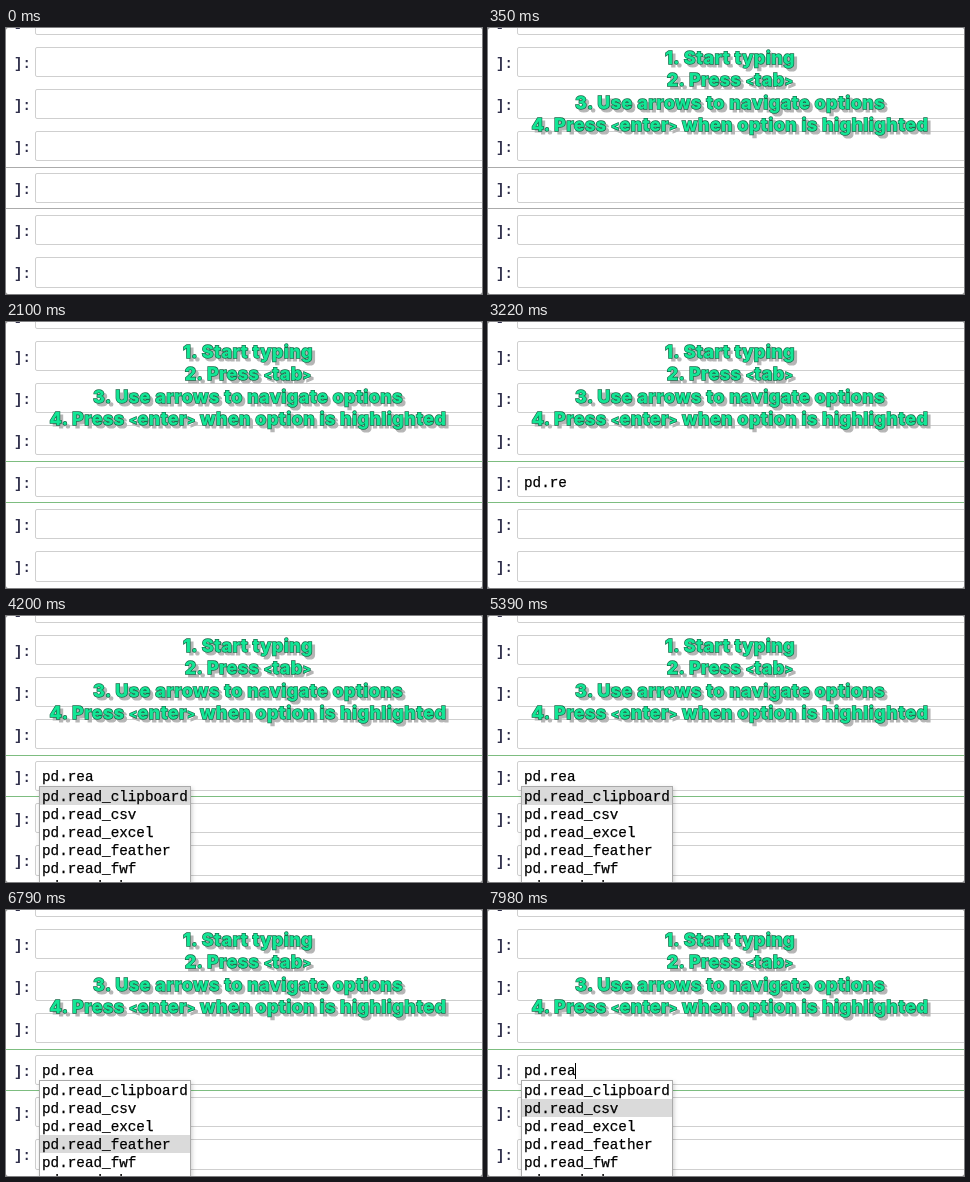
An HTML page for the animation above (8000 ms loop, 476 by 266 pixels).

```html
<!DOCTYPE html>
<html lang="en">
<head>
<meta charset="utf-8">
<title>Tab completion</title>
<style>
  html, body { margin: 0; width: 100%; height: 100%; overflow: hidden; background: #777; }
  svg { display: block; width: 476px; height: 266px; background: #fff; border-radius: 2px; }
  text { white-space: pre; }
  .code { font: 14.3px "Liberation Mono", monospace; fill: #000; stroke: #000; stroke-width: .25px; }
  .prompt { font: 700 14px "Liberation Mono", monospace; fill: #30304c; }
  .box { fill: #fff; stroke: #cfcfcf; }
  .title { font: 800 18px Inter, sans-serif; letter-spacing: .43px; text-anchor: middle; }
  .bracket { font-size: 12px; }
  .shadow { fill: #b5b5b5; stroke: #b5b5b5; stroke-width: 1.2px; }
  .face { fill: #12e695; stroke: #176b49; stroke-width: 1.3px; paint-order: stroke; }
</style>
</head>
<body>
<svg id="stage" viewBox="0 0 476 266"></svg>
<script>
const LOOP = 8000;
const ROW = 18;
const stage = document.getElementById('stage');

function add(parent, tag, attrs = {}, text = '') {
  const node = document.createElementNS(stage.namespaceURI, tag);
  for (const key in attrs) node.setAttribute(key, attrs[key]);
  node.textContent = text;
  return parent.appendChild(node);
}

// Notebook cells
for (let i = -1; i < 6; i++) {
  const y = 19.5 + i * 42;
  const bottom = Math.round(48.05 + i * 42.1) + 0.5;
  add(stage, 'rect', { class: 'box', x: 29.5, y, width: 460, height: bottom - y, rx: 1.5 });
  add(stage, 'text', { class: 'prompt', x: 8, y: y + 20 }, ']:');
}
const edges = [139.5, 180.5].map(y =>
  add(stage, 'path', { d: `M0 ${y}H476`, fill: 'none' }));

const typed = add(stage, 'text', { class: 'code', x: 36, y: 165 });
const caret = add(stage, 'rect', { y: 153, width: 1, height: 16 });

// Instructions, with small angle brackets
const title = add(stage, 'g');
const lines = [
  ['1. Start typing', 36],
  ['2. Press <tab>', 58],
  ['3. Use arrows to navigate options', 81],
  ['4. Press <enter> when option is highlighted', 103]
];
function addTitle(layer, offset) {
  for (const [text, y] of lines) {
    const line = add(title, 'text', { class: 'title ' + layer, x: 242 + offset, y: y + offset });
    let lift = 0;
    for (const part of text.split(/([<>])/)) {
      const bracket = part === '<' || part === '>';
      const dy = bracket ? -1 : lift;
      add(line, 'tspan', { class: bracket ? 'bracket' : '', dy }, part);
      lift = bracket ? 1 : 0;
    }
  }
}
addTitle('shadow', 3);
addTitle('face', 0);

// Completion menu
const menu = add(stage, 'g');
add(menu, 'rect', { x: 33.5, y: 170.5, width: 151, height: 120, fill: '#fff', stroke: '#aaa',
  style: 'filter: drop-shadow(1px 2px 2px #0003)' });
const bar = add(menu, 'rect', { x: 34, width: 150, height: ROW, fill: '#dadada' });
['clipboard', 'csv', 'excel', 'feather', 'fwf', 'gbq'].forEach((name, i) =>
  add(menu, 'text', { class: 'code', x: 36, y: 184.5 + i * ROW }, 'pd.read_' + name));

const KEYS = [2590, 2660, 2800, 3080, 3150, 3290];
const CHOICES = [[0, 0], [5460, 1], [5670, 2], [5810, 3], [6160, 2], [6300, 1],
  [6580, 2], [6650, 3], [6930, 2], [7070, 1]];
const MENU_AT = 3710, EDIT_AT = 1470, TITLE_AT = 70;
const BLINK = 530, BLINK_PHASE = 40;

function show(node, on) {
  node.setAttribute('visibility', on ? 'visible' : 'hidden');
}

function render(t) {
  show(title, t >= TITLE_AT);
  const editing = t >= EDIT_AT;
  for (const edge of edges) edge.setAttribute('stroke', editing ? '#7dbd80' : '#ababab');

  const count = KEYS.filter(at => t >= at).length;
  typed.textContent = 'pd.rea'.slice(0, count);
  caret.setAttribute('x', 36 + Math.round(count * 8.45));
  show(caret, editing && Math.floor((t + BLINK_PHASE) / BLINK) % 2 === 1);

  show(menu, t >= MENU_AT);
  const choice = CHOICES.filter(([at]) => t >= at).pop()[1];
  bar.setAttribute('y', 171 + choice * ROW);
}

const start = performance.now();
function tick() {
  render((performance.now() - start) % LOOP);
  requestAnimationFrame(tick);
}
render(0);
tick();
</script>
</body>
</html>
```
